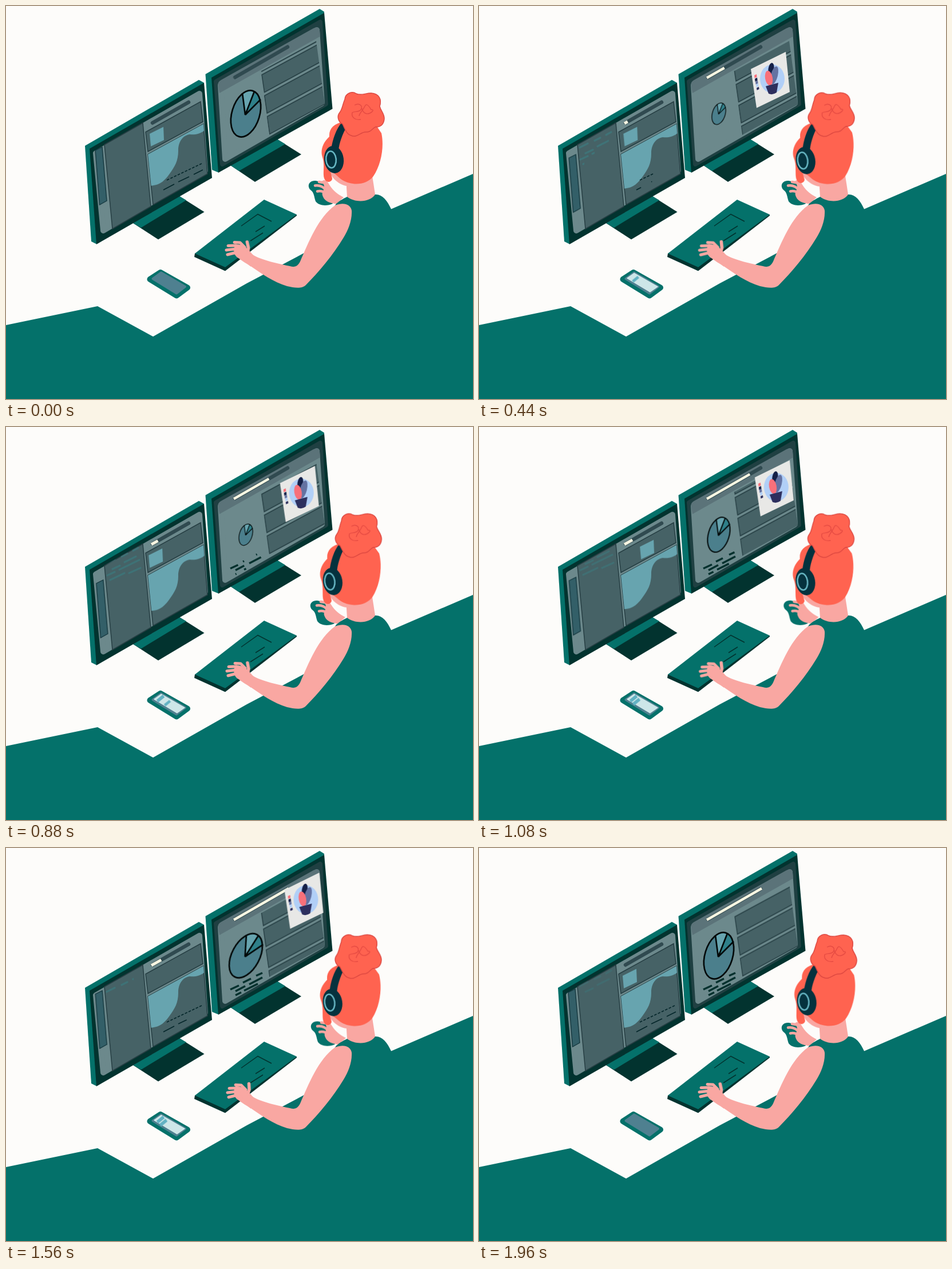
An HTML page that plays this animation: 816 by 686 pixels, repeating every 2000 ms.

```html
<!DOCTYPE html>
<html lang="en">
<head>
<meta charset="utf-8">
<title>Desk work</title>
<style>
html, body { margin: 0; width: 100%; height: 100%; overflow: hidden; background: #fdfcfa; }
svg { display: block; width: 100%; height: 100%; }
.teal { fill: #04716a; }
.dark { fill: #02332f; }
.skin { fill: #f9a7a2; }
.finger { fill: none; stroke: #f9a7a2; stroke-linecap: round; stroke-linejoin: round; }
.round { stroke-linejoin: round; }
.screen { fill: #6c898c; stroke: #6c898c; }
.panel { fill: #466266; stroke: #263e43; stroke-width: 1.5; }
.blue { fill: #67a4af; }
.track { stroke: #304a50; stroke-linecap: round; }
.fill { stroke: #f8f6e2; }
.ink { fill: none; stroke: #04262a; }
.code { fill: none; stroke: #3f7377; stroke-width: 3.2; stroke-linecap: round; }

/* Everything shares one two-second clock */
.a { animation: 2s linear infinite both; }
.draw { stroke-dasharray: 0 200; }

.head { transform-origin: 618px 335px; animation: nod .66667s linear infinite; }
@keyframes nod { 50% { transform: rotate(-3.05deg); } }

.mouse { animation-name: drag; }
@keyframes drag {
  0%, 24%, 95%, 100% { transform: none; }
  32% { transform: translate(1.3px, -1px); }
  44% { transform: translate(3px, -2px); }
  64%, 80% { transform: translate(4px, -2.4px); }
}
.thumb { transform-origin: 425px 430px; animation-name: thumb; }
@keyframes thumb {
  0%, 98%, 100% { transform: rotate(-10deg); }
  14%, 64%, 78% { transform: none; }
  32%, 44% { transform: rotate(-8deg); }
}
.tips { transform-origin: 420px 440px; animation-name: tips; }
@keyframes tips {
  0%, 32%, 98%, 100% { transform: none; }
  14% { transform: translate(.5px, .5px); }
  44% { transform: translate(1px, 0); }
  64%, 78% { transform: translate(2px, 1px); }
}

.rows { animation: rows 1s linear infinite; }
@keyframes rows { 95%, 100% { transform: translate(4.6px, 36.5px); } }

.bar { animation-name: bar; }
@keyframes bar { 0% { stroke-dasharray: 0 200; } 69%, 100% { stroke-dasharray: 100 200; } }
.load { animation-name: load; }
@keyframes load {
  0%, 84%, 100% { stroke-dasharray: 0 200; }
  66%, 81% { stroke-dasharray: 26 200; }
}

.pie { transform-origin: 419px 188px; animation-name: pie; }
@keyframes pie {
  0%, 4%, 98%, 100% { transform: none; }
  14% { transform: scale(.8); }
  32% { transform: scale(.05); }
  44% { transform: scale(.46); }
  62% { transform: scale(.98); }
  64% { transform: rotate(1.5deg); }
  78%, 80% { transform: rotate(11deg); }
}
.note { animation-name: note; }
@keyframes note {
  0%, 42% { stroke-dasharray: 0 200; }
  56%, 100% { stroke-dasharray: 100 200; }
}
.early { animation-name: early; }
@keyframes early {
  0%, 36% { stroke-dasharray: 0 200; }
  45%, 100% { stroke-dasharray: 100 200; }
}

.card { transform-origin: 509.5px 129.5px; animation-name: card; }
@keyframes card {
  0%, 4% { transform: scale(0); }
  19%, 32% { transform: none; }
  69%, 80% { transform: translate(11.5px, -37px); }
  84%, 100% { transform: translate(11.5px, -37px) scale(0); }
}

.scroll { animation-name: scroll; }
@keyframes scroll {
  0%, 98%, 100% { transform: none; }
  14% { transform: translate(.8px, 9px); }
  32% { transform: translate(1.6px, 18.5px); }
  44% { transform: translate(1.8px, 21px); }
  64% { transform: translate(1px, 11.5px); }
  78% { transform: translate(.2px, 3px); }
}
.wave { animation-name: wave; }
@keyframes wave {
  0%, 78%, 100% { transform: none; }
  14% { transform: translateY(3px); }
  32%, 44% { transform: translateY(7.5px); }
  64% { transform: translateY(1.5px); }
}
.thumbnail { animation-name: thumbnail; }
@keyframes thumbnail {
  0%, 98%, 100% { transform: translate(2px, -1px); }
  14% { transform: translate(6px, -2px); }
  32%, 44% { transform: none; }
  64% { transform: translate(64px, -30px); }
  76%, 80% { transform: translate(104px, -52px); }
  80.01% { transform: translate(-34px, 18px); }
}

.dashes { animation-name: dashes; }
@keyframes dashes {
  0%, 14% { clip-path: inset(-3px 0 -3px -3px); }
  28% { clip-path: inset(-3px 105% -3px -3px); }
  28.01%, 60% { clip-path: inset(-3px -3px -3px 105%); }
  69%, 100% { clip-path: inset(-3px -3px -3px -3px); }
}
.l1 { animation-name: l1; }
@keyframes l1 {
  0%, 14%, 63%, 100% { stroke-dasharray: 100 200; }
  28%, 58% { stroke-dasharray: 0 200; }
}
.l2 { animation-name: l2; }
@keyframes l2 {
  0%, 81%, 100% { stroke-dasharray: 100 200; }
  14% { stroke-dasharray: 66 200; }
  23%, 68% { stroke-dasharray: 0 200; }
}
.l3 { animation-name: l3; }
@keyframes l3 {
  0%, 95%, 100% { stroke-dasharray: 100 200; }
  11%, 80% { stroke-dasharray: 0 200; }
}

.type { animation-name: type; animation-delay: var(--d); }
@keyframes type {
  0% { clip-path: inset(-3px 105% -3px -3px); }
  10%, 70% { clip-path: inset(-3px -3px -3px -3px); }
  70.01%, 100% { clip-path: inset(-3px 105% -3px -3px); }
}
.first { animation-name: first; }
@keyframes first {
  0%, 32% { transform: none; opacity: 1; }
  44% { transform: translateY(-9px); opacity: 1; }
  64% { transform: translateY(-27px); opacity: .6; }
  70%, 100% { transform: translateY(-32px); opacity: 0; }
}
.second { animation-name: second; }
@keyframes second {
  0%, 70% { transform: translateY(4px); opacity: 0; }
  71%, 78% { transform: translateY(4px); opacity: 1; }
  98% { transform: translateY(-6px); opacity: .6; }
  100% { transform: translateY(-7px); opacity: 0; }
}

.lit { animation-name: lit; }
@keyframes lit {
  0%, 2%, 84%, 100% { opacity: 0; }
  10%, 80% { opacity: 1; }
}
.msg { fill: none; stroke: #62b2c3; stroke-width: 5.5; }
.m1 { animation-name: m1; }
@keyframes m1 {
  0%, 11% { transform: translate(282px, 482px) scale(0); }
  14% { transform: translate(282px, 482px) scale(.4); }
  24%, 32% { transform: translate(271.5px, 475.5px); }
  44%, 100% { transform: translate(270px, 474px); }
}
.m2 { animation-name: m2; }
@keyframes m2 {
  0%, 39% { transform: translate(282px, 482px) scale(0); }
  44% { transform: translate(282px, 482px) scale(.85); }
  54%, 100% { transform: translate(275px, 479.5px); }
}
</style>
</head>
<body>
<svg viewBox="0 0 816 686" preserveAspectRatio="none">
  <defs>
    <clipPath id="listClip"><path d="M445 114L542 61L557 172L460 225Z"/></clipPath>
    <clipPath id="codeClip"><path d="M172 242L239 204L253 350L186 389Z"/></clipPath>
    <clipPath id="topClip"><path d="M244 220L340 167L344 202L248 254Z"/></clipPath>
    <clipPath id="chartClip"><path d="M248 259L345 206L352 293L257 347Z"/></clipPath>
    <path id="row" class="panel" d="M447 120L545 67L548.500 98L451.500 150.500Z"/>
    <path id="code1" d="M176 247l14-7M202 235l10-5M222 225l9-5"/>
    <path id="code2" d="M186 257l13-6M207 245l20-10"/>
  </defs>

  <rect width="816" height="686" fill="#fdfcfa"/>

  <!-- stands -->
  <path class="dark" d="M222 379L303 332L346.500 359.500L266 407.500Z"/>
  <path class="teal" d="M222 379L303 332L315 339L236 387Z"/>
  <path class="dark" d="M392 278L473 232L516 259L435 307Z"/>
  <path class="teal" d="M392 278L473 232L488 241L407 288Z"/>

  <!-- left monitor -->
  <path class="teal" d="M138 244L337 129L346 134L347 300L158 415.500L149 411Z"/>
  <path class="dark" d="M146 249L346 134L360 300L158 416Z"/>
  <path class="screen round" stroke-width="10" d="M157 257L338 153L348 288L170 392Z"/>
  <path class="panel" d="M172 242L239 204L253 350L186 389Z"/>
  <path class="scroll a" fill="#335f68" stroke="#12343b" stroke-width="1.3" d="M156 252L168 246L176 340L163.500 347Z"/>
  <g clip-path="url(#codeClip)">
    <g class="code first a">
      <use href="#code1" class="type a" style="--d:.1s"/>
      <use href="#code2" class="type a" style="--d:.26s"/>
      <path class="type a" style="--d:.35s" d="M177 268l13-6M198 258l35-17"/>
      <path class="type a" style="--d:.42s" d="M182 276l25-12M215 264l20-9"/>
    </g>
    <g class="code second a">
      <use href="#code1" class="type a" style="--d:1.4s"/>
      <use href="#code2" class="type a" style="--d:1.56s"/>
    </g>
  </g>
  <path class="track" stroke-width="6.500" d="M256 204L319 168"/>
  <path class="fill load draw a" stroke-width="5" pathLength="100" d="M254 205L320 168"/>
  <path class="panel" d="M244 220L340 167L344 202L248 254Z"/>
  <g clip-path="url(#topClip)"><path class="blue thumbnail a" d="M249 224L273 212L274 235L251 246Z"/></g>
  <path class="panel" d="M248 259L345 206L352 293L257 347Z"/>
  <g clip-path="url(#chartClip)">
    <path class="blue wave a" d="M240 250L350 190L347 217C338 224 329 225 321 224C308 226 301 238 301 252C301 271 295 280 285 294C274 309 266 313 250 314Z"/>
  </g>
  <path class="ink dashes a" stroke-width="1.600" stroke-dasharray="4.500 2.500" d="M281 304L344 274"/>
  <g class="ink" stroke-width="1.500">
    <path class="l1 a" pathLength="100" d="M275 321L294 311"/>
    <path class="l2 a" pathLength="100" d="M301 307L320 298"/>
    <path class="l3 a" pathLength="100" d="M328 294L344 286"/>
  </g>

  <!-- right monitor -->
  <path class="teal" d="M348.500 119L548 5L556 10L558 178L371 290.500L360 286Z"/>
  <path class="dark" d="M359 125L556 12L570.500 179.500L371 291Z"/>
  <path class="round" fill="#1f4042" stroke="#1f4042" stroke-width="8" d="M367 132L549 28L559 171L378 276Z"/>
  <path class="screen round" stroke-width="10" d="M375 138L543 42L552 170L383 267Z"/>
  <path fill="#5b7379" d="M373 152L370.500 138Q370 132 376 129L537 39Q547 34 548 43L549 53Z"/>
  <g clip-path="url(#listClip)">
    <g class="rows">
      <use href="#row" x="-4.600" y="-36.500"/>
      <use href="#row"/>
      <use href="#row" x="4.600" y="36.500"/>
      <use href="#row" x="9.200" y="73"/>
    </g>
  </g>
  <path class="track" stroke-width="6.500" d="M400 124.500L492 71.500"/>
  <path class="fill bar draw a" stroke-width="4.500" pathLength="100" d="M398 125.500L494 70.500"/>
  <g class="pie a">
    <ellipse cx="419" cy="188" rx="24.200" ry="41.700" transform="rotate(17 419 188)" fill="#4b7f8c"/>
    <path class="blue" d="M418 190L413 152Q424 145 434 149Z"/>
    <path fill="#2f808a" d="M418 190L434 149Q442 153 445 163Z"/>
    <g fill="none" stroke="#020909" stroke-width="2.700">
      <ellipse cx="419" cy="188" rx="24.200" ry="41.700" transform="rotate(17 419 188)"/>
      <path d="M413 152L418 190L434 149M418 190L445 163"/>
    </g>
  </g>
  <g fill="none" stroke="#04302d" stroke-width="3.500">
    <path class="note early draw a" pathLength="100" d="M392 247L407 240"/>
    <path class="note draw a" pathLength="100" d="M414 235L428 228"/>
    <path class="note draw a" pathLength="100" d="M437 223L448 218"/>
    <path class="note early draw a" pathLength="100" d="M401 250L418 241"/>
    <path class="note early draw a" pathLength="100" d="M425 238L448 226"/>
    <path class="note draw a" pathLength="100" d="M401 257L411 252"/>
    <path class="note draw a" pathLength="100" d="M416 249L440 237"/>
  </g>
  <g class="card a">
    <path fill="#e8e8e6" d="M475 110L536 80L543 150L485 178Z"/>
    <ellipse cx="512.500" cy="127" rx="21.500" ry="25" fill="#b1cff7"/>
    <ellipse cx="510.500" cy="110" rx="5" ry="11" transform="rotate(8 510 110)" fill="#141f47"/>
    <ellipse cx="516" cy="121" rx="6" ry="16" transform="rotate(14 516 121)" fill="#6472a2"/>
    <ellipse cx="506.500" cy="126" rx="6.500" ry="13" transform="rotate(-10 506 126)" fill="#f8707a"/>
    <path fill="#2d2f5e" d="M501 140L523 134L520 151Q513 156 506 153Z"/>
    <path fill="#f8707a" d="M481 121l4-2l.6 5l-4 2z"/>
    <path fill="#141f47" d="M482 127l4-2l.6 5l-4 2z"/>
    <path fill="#6472a2" d="M483 132l4-2l.6 5l-4 2z"/>
    <path fill="#b1cff7" d="M484 137l4-2l.6 5l-4 2z"/>
    <path fill="#2d2f5e" d="M485 143l4-2l.6 4l-4 2z"/>
  </g>

  <!-- keyboard -->
  <path class="dark" d="M330 432L508 364L508 366L383 462.500L329 438Z"/>
  <path class="teal" d="M330 432L451 338L508 364L383 456Z"/>
  <path fill="none" stroke="#02332f" stroke-width="1.500" d="M411 384L440 363.500L464 376M436 394L452 384M427 410L449 396"/>

  <!-- phone -->
  <path class="teal round" stroke="#04716a" stroke-width="10" d="M251.500 477L270 465L317 491.500L298 505.500Z"/>
  <path class="round" fill="#4f8090" stroke="#4f8090" stroke-width="4" d="M256.500 476L271 465.500L313 490L298 501.500Z"/>
  <g class="lit a">
    <path class="round" fill="#cde6e8" stroke="#cde6e8" stroke-width="1.500" d="M259 475L271 466.500L312 490L299 499Z"/>
    <path class="msg m1 a" d="M-5.500 4.500L5.500 -4.500"/>
    <path class="msg m2 a" d="M-5.500 4.500L5.500 -4.500"/>
  </g>

  <!-- mouse and far hand -->
  <g class="mouse a">
    <path class="teal" d="M541 305C530 304 525 314 532 321C539 326 538 333 541 341C548 350 562 349 571 345L556 308Z"/>
    <path class="skin" d="M552 306C557 301 562 306 565 312C572 323 580 329 590 334L577 345.500C566 344 557 341 554 333C550 325 556 322 556 317C556 312 554 309 552 306Z"/>
    <path class="finger" stroke-width="4.500" d="M540 313.500C547 312.500 553 314 559 321M544 323.500C550 322 555 324 560 327M547 307L556 308.500"/>
  </g>

  <!-- floor, chair and top -->
  <path class="teal" d="M0 557L160 524L257 577L420 484.500L523 430L577 345C584 339 590 336 596 333L645 329C657 328 666 339 673 354.500L816 293V686H0Z"/>
  <path class="skin" d="M594 300L596 333C610 344 636 343 645 329L639 290Z"/>

  <!-- near arm -->
  <path class="skin" d="M575 348C590 342 602 346 604 357C605 374 598 391 590 404C572 434 546 465 524 487C517 494 504 492 491 489C468 482 446 467 426 453L428 432C440 442 472 449 500 455C507 456 511 452 514 446C528 414 546 368 575 348Z"/>
  <path class="skin" d="M401 416C411 415 420 421 425 427L432 435L428 455C420 449 412 445 406 440C398 436 396 424 401 416Z"/>
  <path class="finger thumb a" stroke-width="5.500" d="M424.500 411.500L425 422L422 431"/>
  <path class="finger tips a" stroke-width="5" d="M399 412.500L409 413L417 421M388 418.500L402 418L410 424M385 426L398 424.500L408 428M387 434L399 431L409 435"/>

  <!-- head -->
  <g class="head">
    <path class="skin" d="M560 278C567 300 582 316 606 315L625 295L590 260Z"/>
    <path fill="#ff6350" d="M590 202C573 205 564 214 565 228C553 239 549 253 553 264C558 278 552 295 557 303C561 310 570 307 570 301L567 289C575 291 581 300 588 304C605 314 630 313 642 297C656 276 661 245 656 222L640 198Z"/>
    <path fill="#05323e" d="M587 203C577 214 571 232 568 250L581 253C582 239 588 224 595 211Z"/>
    <ellipse cx="573" cy="268" rx="17" ry="24" transform="rotate(-7 573 268)" fill="#05323e"/>
    <ellipse cx="568" cy="268" rx="8.800" ry="14.500" transform="rotate(-5 568 268)" fill="none" stroke="#67b7c4" stroke-width="2.600"/>
    <path fill="#ff6350" stroke="#dc4740" stroke-width="1.500" d="M592 163C593 152 605 148 612 153C620 157 628 152 638 152C652 153 657 163 653 175C655 184 661 187 661 197C660 208 653 212 646 211C640 213 638 221 628 220C620 220 612 231 603 226C595 224 592 214 588 206C580 202 578 192 583 186C588 180 588 172 592 163Z"/>
    <path fill="none" stroke="#e54a42" stroke-width="1.400" d="M609 173C618 168 624 175 620 181C616 186 609 183 605 186C603 194 610 200 620 198M621 177C624 187 629 190 636 187C642 184 643 180 638 181C633 172 629 170 627 175C624 182 618 186 617 192"/>
  </g>
</svg>
</body>
</html>
```
